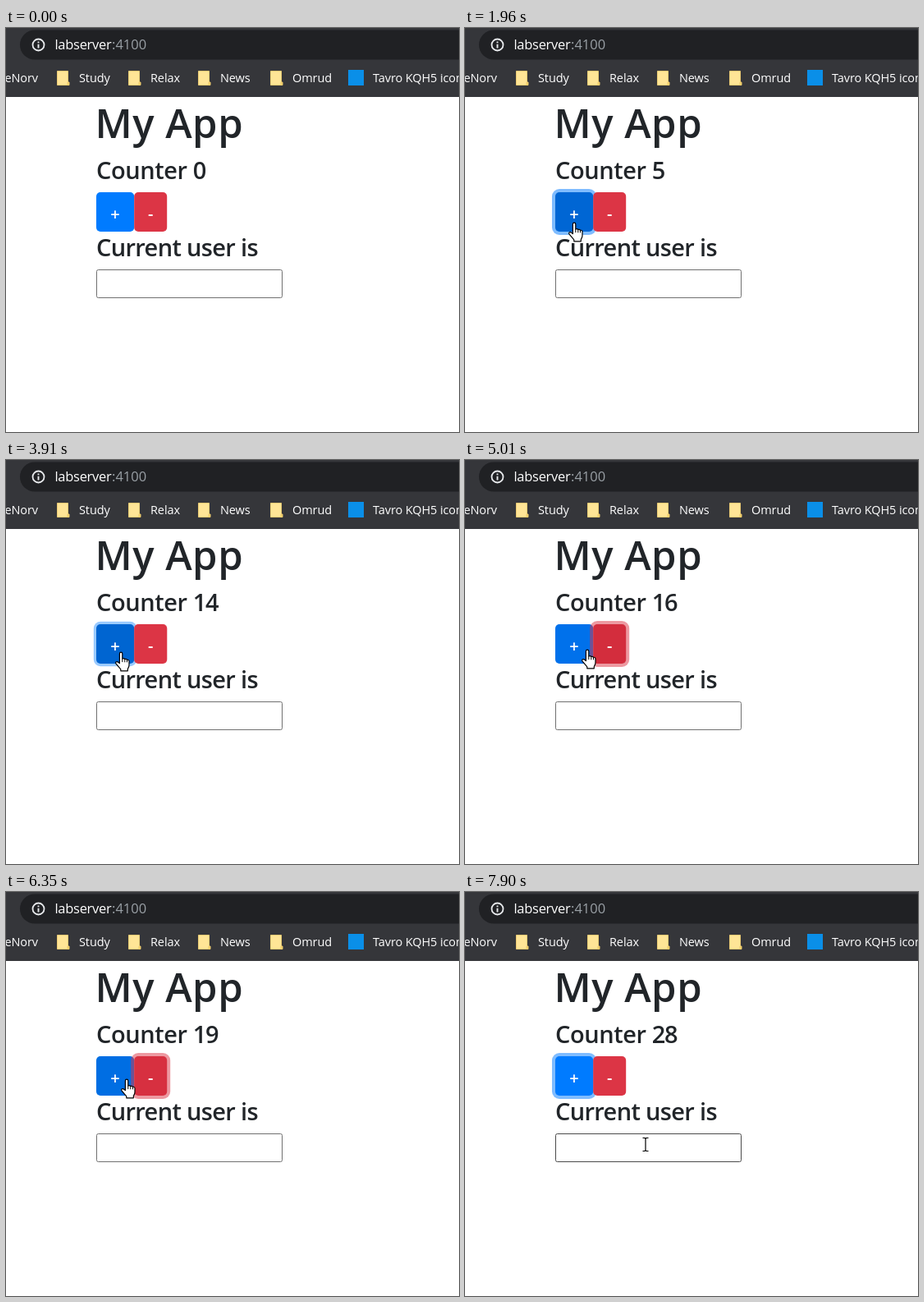
An HTML page for the animation above (8000 ms loop, 552 by 492 pixels).

```html
<!DOCTYPE html>
<html lang="en">
<head>
<meta charset="utf-8">
<title>Counter</title>
<style>
  html, body { margin: 0; width: 100%; height: 100%; overflow: hidden; background: #fff; }
  svg { display: block; width: 552px; height: 492px; }
  text { font-family: "Open Sans", "Noto Sans", sans-serif; white-space: pre; }
  .mark { font-size: 14.5px; letter-spacing: -.1px; fill: #fff; }
  .url { font-size: 16.5px; }
  .head { font-weight: 600; fill: #212529; }
  .h3 { font-size: 29px; }
  .sign { font-size: 20px; font-weight: 600; fill: #fff; text-anchor: middle; }
  .pointer { fill: #fff; stroke: #000; stroke-width: 1.2; stroke-linejoin: round; }
</style>
</head>
<body>
<svg viewBox="0 0 552 492">
  <defs>
    <g id="folder">
      <path d="M.5 .5H13.5V14H15V17.5H.5Z" fill="#ffe596" stroke="#eccb74"/>
      <path d="M12.5 14H15V18H12.5Z" fill="#f3cf6b"/>
    </g>
  </defs>

  <rect width="552" height="84" fill="#35363a"/>
  <rect x="17" y="2.5" width="600" height="36" rx="18" fill="#202124"/>
  <circle cx="39.5" cy="20.5" r="7" fill="none" stroke="#e8eaed" stroke-width="1.8"/>
  <path d="M39.5 16.4v1.9M39.5 19.8v4.6" stroke="#e8eaed" stroke-width="1.9"/>
  <text class="url" x="59.5" y="26" fill="#fff" letter-spacing="-.3">labserver</text>
  <text class="url" x="129" y="26" fill="#9aa0a6">:4100</text>

  <text class="mark" x="39" y="66" text-anchor="end">eNorv</text>
  <use href="#folder" x="62" y="52"/>
  <text class="mark" x="89" y="66">Study</text>
  <use href="#folder" x="149" y="52"/>
  <text class="mark" x="176" y="66">Relax</text>
  <use href="#folder" x="234" y="52"/>
  <text class="mark" x="261" y="66">News</text>
  <use href="#folder" x="322" y="52"/>
  <text class="mark" x="349" y="66">Omrud</text>
  <rect x="417" y="51" width="19" height="19" fill="#0a8fe8"/>
  <text class="mark" x="447" y="66">Tavro KQH5 icons</text>

  <text class="head" x="108.5" y="134" font-size="49" letter-spacing=".5">My App</text>
  <text class="head h3" x="110" y="184" letter-spacing="-.4">Counter <tspan id="count" letter-spacing="-1.5">0</tspan></text>
  <g id="plus">
    <rect class="ring" fill="#007bff"/>
    <rect x="110" y="200" width="46.2" height="48" rx="5"/>
    <text class="sign" x="133" y="233.5">+</text>
  </g>
  <g id="minus">
    <rect class="ring" fill="#dc3545"/>
    <rect x="156.2" y="200" width="40" height="48" rx="5"/>
    <text class="sign" x="176.2" y="233">-</text>
  </g>
  <text class="head h3" x="110" y="278" letter-spacing="-.65">Current user is</text>
  <rect id="field" x="110.5" y="294.5" width="226" height="34" rx="2" fill="#fff"/>

  <g id="cursor">
    <path id="arrow" class="pointer" d="M.5 .5V18.6L4.6 14.8 7.4 21.2 9.8 20.2 7.1 13.8H12.3Z"/>
    <g id="hand" transform="translate(-7 .5)">
      <path class="pointer" d="M5.4 14V2.4a1.7 1.7 0 0 1 3.4 0V8.6q1.8-1 3 .4 1.8-.7 2.7.8 2.5-.4 2.5 2V16q0 2-1 3.6l-.7 1.6V23.3H6.8V21.4L1.1 14.6q-1-1.6.4-2.3 1.6-.5 3.9 1.7Z"/>
      <path d="M8.8 8.6v4M11.8 9v3.8M14.5 9.8v3" fill="none" stroke="#000"/>
    </g>
    <path id="beam" d="M-3.5 -8.5H-1L0 -7.5 1 -8.5H3.5M0 -7.5V6.5M-3.5 7.5H-1L0 6.5 1 7.5H3.5" fill="none" stroke="#000" stroke-width="1.2"/>
  </g>
</svg>
<script>
const LOOP = 8000, STEP = 78.1, FADE = 150;
const PRESS = 90, GAP = 160, GLIDE = 380, LEAD = 640;
const $ = id => document.getElementById(id);
const lerp = (a, b, k) => a + (b - a) * k;

const plus = { el: $('plus'), x: 110, w: 46.2, add: 5, shades: [[0, 123, 255], [0, 105, 217], [0, 98, 204]] };
const minus = { el: $('minus'), x: 156.2, w: 40, add: -1, shades: [[220, 53, 69], [200, 35, 51], [189, 33, 48]] };
const buttons = [plus, minus];

// The pointer visits a button and clicks it a few times, GAP apart.
const visits = [
  { button: plus, at: 1790, clicks: 1 },
  { button: plus, at: 2270, clicks: 1 },
  { button: minus, at: 2980, clicks: 1 },
  { button: plus, at: 3800, clicks: 2 },
  { button: minus, at: 4420, clicks: 3 },
  { button: plus, at: 5440, clicks: 1 },
  { button: minus, at: 5880, clicks: 2 },
  { button: plus, at: 6500, clicks: 1 },
  { button: minus, at: 6880, clicks: 1 },
  { button: plus, at: 7200, clicks: 1 }
];

const presses = visits.flatMap(({ button, at, clicks }) =>
  Array.from({ length: clicks }, (_, i) => ({ button, at: at + i * GAP })));

// Each stop is a place the pointer starts gliding to at time `go`.
const stops = [
  { go: 0, x: 515, y: 240 },
  { go: 200, x: 300, y: 114 },
  { go: 600, x: 189, y: 199 }
];
let free = 1010;
visits.forEach(({ button, at, clicks }, i) => {
  const go = i ? Math.max(free, at - LEAD) : free;
  const x = button === plus ? Math.min(141, 132.5 + 2.5 * i) : 170;
  stops.push({ go, x, y: 237 - 1.5 * i });
  free = at + (clicks - 1) * GAP + PRESS;
});
stops.push({ go: free, x: 399, y: 303 }, { go: 7790, x: 220, y: 308, glide: 100 });

function pointer(t) {
  const i = Math.max(0, stops.filter(s => s.go <= t).length - 1);
  const to = stops[i], from = stops[Math.max(0, i - 1)];
  const k = Math.min(1, Math.max(0, t - to.go) / (to.glide || GLIDE));
  const ease = 1 - (1 - k) ** 2;
  return [lerp(from.x, to.x, ease), lerp(from.y, to.y, ease)];
}

const inside = ([x, y], left, top, w, h) => x >= left && x < left + w && y >= top && y < top + h;
const hovered = (b, t) => inside(pointer(t), b.x, 200, b.w, 48);
const latest = t => presses.filter(p => p.at <= t).pop();
const focused = (b, t) => latest(t)?.button === b ? 1 : 0;
const level = (b, t) => focused(b, t) && t < latest(t).at + PRESS ? 2 : hovered(b, t) ? 1 : 0;

// A linear transition equals the mean of the state over its duration.
function faded(state, b, t) {
  const n = 15;
  let sum = 0;
  for (let i = 0; i < n; i++) sum += state(b, t - FADE * i / n);
  return sum / n;
}

function shade(list, v) {
  const i = Math.min(1, Math.floor(v));
  return `rgb(${list[i].map((c, j) => Math.round(lerp(c, list[i + 1][j], v - i)))})`;
}

function set(el, attrs) {
  for (const key in attrs) el.setAttribute(key, attrs[key]);
}

function draw(t) {
  $('count').textContent = presses.reduce((sum, p) => p.at + 50 <= t ? sum + p.button.add : sum, 0);

  for (const b of buttons) {
    const [ring, face] = b.el.querySelectorAll('rect');
    const glow = faded(focused, b, t), r = 4 * glow;
    set(ring, { x: b.x - r, y: 200 - r, width: b.w + 2 * r, height: 48 + 2 * r, rx: 5 + r, opacity: glow / 2 });
    set(face, { fill: shade(b.shades, faded(level, b, t)) });
  }

  const pos = pointer(t);
  const inField = inside(pos, 110, 294, 227, 35);
  const kind = inField ? 'beam' : buttons.some(b => hovered(b, t)) ? 'hand' : 'arrow';
  set($('field'), { stroke: inField ? '#4a4a4a' : '#707070' });
  set($('cursor'), { transform: `translate(${pos.map(Math.round)})`, visibility: t < stops[1].go ? 'hidden' : 'visible' });
  for (const id of ['arrow', 'hand', 'beam']) set($(id), { display: id === kind ? 'inline' : 'none' });
}

const start = performance.now();
function tick() {
  const t = (performance.now() - start) % LOOP;
  draw(Math.floor(t / STEP) * STEP + 12);
  requestAnimationFrame(tick);
}
tick();
</script>
</body>
</html>
```
